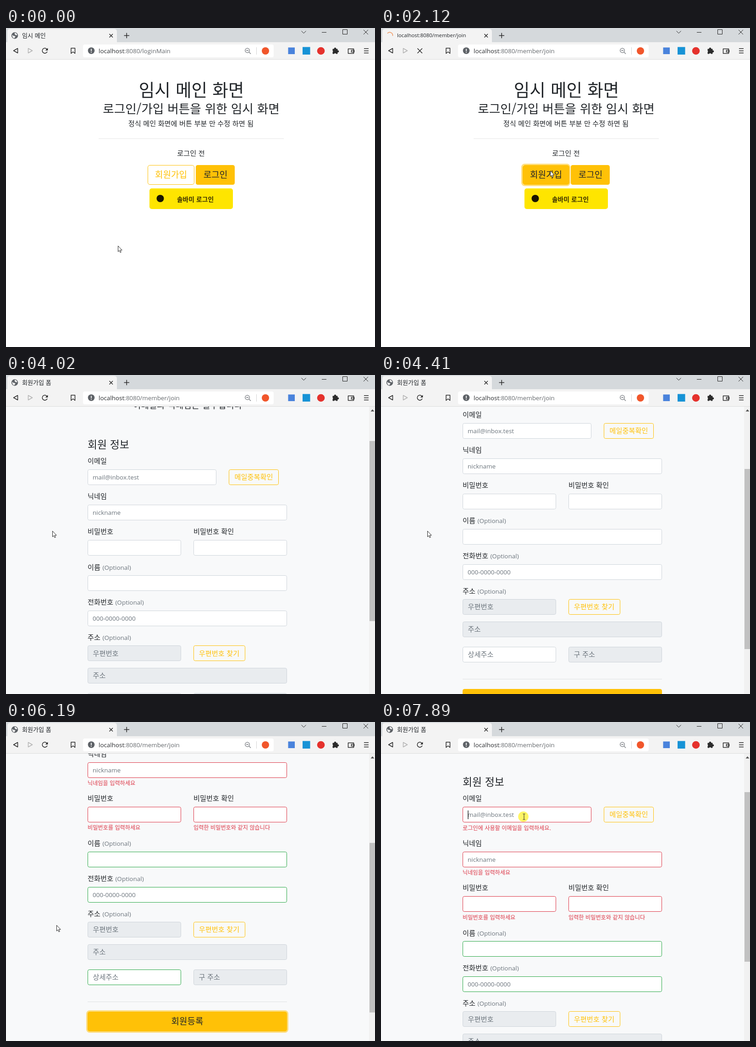
Write an HTML page that moves like this. It is 805x696 px and loops after 8000 ms.

```html
<!DOCTYPE html>
<html lang="ko">
<head>
<meta charset="utf-8">
<title>회원가입</title>
<style>
html, body { margin: 0; width: 100%; height: 100%; overflow: hidden; background: #fff; }
svg { display: block; width: 805px; height: 696px; }

/* type */
text { font: 300 15.2px "Noto Sans CJK KR", "Noto Sans CJK", sans-serif; word-spacing: .015em; fill: #212529; white-space: pre; }
.mid { text-anchor: middle; }
.latin { font: 400 13.5px "Open Sans", sans-serif; word-spacing: 0; }
.hint, .hint tspan { fill: #6c757d; }
.big { font-size: 19px; }
.tab { font-size: 13px; }
.tab.latin { font-size: 11.4px; }
.url { font-size: 13.4px; fill: #2b2d30; }
.url tspan { fill: #666a6e; }
.gold { fill: #ffc107; }
.note { font-size: 12.15px; fill: #dc3545; }

/* shapes */
.line { fill: none; stroke: #2b2b2b; stroke-width: 1.5; }
.thin { fill: none; stroke: #222; stroke-width: 1; }
.in { height: 33px; rx: 3.2px; fill: #fff; stroke: #ced4da; }
.off { fill: #e9ecef; }
.btn { rx: 4.3px; fill: #ffc107; }
.ghost { height: 33px; rx: 3.2px; fill: none; stroke: #ffc107; }
.ring { rx: 6px; fill: none; stroke: #ffc107; stroke-opacity: .5; stroke-width: 3; }

/* one shared eight second loop */
.home, .join, .before, .after, .idle, .busy, .ready, .bad, .ok, .note, .push,
.focus1, .focus2, .arrow, .hand, .beam, .click, .caret, .up { animation: 8s step-end infinite; }
.home { animation-name: home; }
.join { animation-name: join; }
.before { animation-name: before; }
.after { animation-name: after; }
.idle { animation-name: idle; }
.busy { animation-name: busy; }
.ready { animation-name: ready; }
.bad { animation-name: bad; }
.ok { animation-name: ok; }
.note { animation-name: note; }
.push { animation-name: push; }
.focus1 { animation-name: focus1; }
.focus2 { animation-name: focus2; }
.arrow { animation-name: arrow; }
.hand { animation-name: hand; }
.beam { animation-name: beam; }
.click { animation-name: click; }
.caret { animation-name: caret; }
.up { animation-name: up; }
.signup { animation: signup 8s linear infinite; }
.signup-text { animation: signup-text 8s linear infinite; }
.submit { animation: submit 8s linear infinite; }
.scroll { animation: scroll 8s ease-in-out infinite; }
.thumb { fill: #c1c1c1; animation: thumb 8s ease-in-out infinite, thumb-size 8s step-end infinite; }
.cursor { animation: cursor 8s ease-in-out infinite; }
.spin { transform-origin: 19px 16px; animation: spin 1s -.88s linear infinite; }

@keyframes home { 0% { opacity: 1 } 36.875%, to { opacity: 0 } }
@keyframes join { 0% { opacity: 0 } 38.625%, to { opacity: 1 } }
@keyframes before { 0% { opacity: 1 } 20.25%, to { opacity: 0 } }
@keyframes after { 0% { opacity: 0 } 20.25%, to { opacity: 1 } }
@keyframes idle { 0% { opacity: 1 } 20.25% { opacity: 0 } 39.25%, to { opacity: 1 } }
@keyframes busy { 0% { opacity: 0 } 20.25% { opacity: 1 } 39.25%, to { opacity: 0 } }
@keyframes ready { 0% { opacity: 0 } 39.25%, to { opacity: 1 } }
@keyframes bad { 0% { stroke: #ced4da } 67.75%, to { stroke: #dc3545 } }
@keyframes ok { 0% { stroke: #ced4da } 67.75%, to { stroke: #28a745 } }
@keyframes note { 0% { opacity: 0 } 67.75%, to { opacity: 1 } }
@keyframes push { 0% { transform: none } 67.75%, to { transform: translateY(var(--d)) } }
@keyframes focus1 { 0% { opacity: 0 } 19.375%, to { opacity: 1 } }
@keyframes focus2 { 0% { opacity: 0 } 67.25%, to { opacity: 1 } }
@keyframes caret { 0% { opacity: 0 } 98.625%, to { opacity: 1 } }
@keyframes up { 0% { fill: #a3a3a3 } 48.25%, to { fill: #505050 } }
@keyframes click {
  0% { opacity: 0 } 19.375% { opacity: .6 } 21.25% { opacity: 0 }
  67.25% { opacity: .6 } 68.5% { opacity: 0 } 98.625%, to { opacity: .6 }
}
@keyframes arrow {
  0% { opacity: 1 } 11.25% { opacity: 0 } 21.25% { opacity: 1 } 64.2% { opacity: 0 }
  68.6% { opacity: 1 } 89.9% { opacity: 0 } 90.8% { opacity: 1 } 93.1%, to { opacity: 0 }
}
@keyframes hand {
  0% { opacity: 0 } 11.25% { opacity: 1 } 21.25% { opacity: 0 }
  64.2% { opacity: 1 } 68.6%, to { opacity: 0 }
}
@keyframes beam { 0% { opacity: 0 } 89.9% { opacity: 1 } 90.8% { opacity: 0 } 93.1%, to { opacity: 1 } }
@keyframes signup { 0%, 11.25% { fill: #fff } 13.25%, to { fill: #ffc107 } }
@keyframes signup-text { 0%, 11.25% { fill: #ffc107 } 13.25%, to { fill: #212529 } }
@keyframes submit { 0%, 64.25% { fill: #ffc107 } 66.25%, 68.5% { fill: #e0a800 } 70.375%, to { fill: #ffc107 } }
@keyframes scroll {
  0%, 48.125% { transform: none }
  50.25%, 52.25% { transform: translateY(-99px) }
  55%, 55.125% { transform: translateY(-200px) }
  57.9%, 67.74% { transform: translateY(-298px) }
  67.75%, 77% { transform: translateY(-319px) }
  79.75% { transform: translateY(-219px); animation-timing-function: ease-in }
  80.75% { transform: translateY(-204px); animation-timing-function: ease-out }
  83.375%, to { transform: translateY(-120px) }
}
@keyframes thumb {
  0%, 48.125% { transform: none }
  50.25%, 52.25% { transform: translateY(59px) }
  55%, 55.125% { transform: translateY(120px) }
  57.9%, 67.74% { transform: translateY(178px) }
  67.75%, 77% { transform: translateY(181px) }
  79.75% { transform: translateY(124px); animation-timing-function: ease-in }
  80.75% { transform: translateY(116px); animation-timing-function: ease-out }
  83.375%, to { transform: translateY(68px) }
}
@keyframes thumb-size { 0% { height: 393px } 67.75%, to { height: 370px } }
@keyframes cursor {
  0%, 5.4% { transform: translate(244px, 475px) }
  13.625%, 26.5% { transform: translate(369px, 311px) }
  36% { transform: translate(110px, 334px) }
  36.875%, 58% { transform: translate(101px, 340px) }
  65%, 68.5% { transform: translate(319px, 603px) }
  72.125%, 74.125% { transform: translate(118px, 443px) }
  75.5%, 85% { transform: translate(110px, 443px) }
  94.5%, 95.25% { transform: translate(311px, 207px) }
  96%, to { transform: translate(312px, 207px) }
}
@keyframes spin { to { transform: rotate(360deg) } }
</style>
</head>
<body>
<svg width="805" height="696" xmlns="http://www.w3.org/2000/svg">
  <clipPath id="view"><rect y="69" width="805" height="627"/></clipPath>
  <rect width="805" height="696" fill="#fff"/>

  <!-- first page -->
  <g class="home">
    <text class="mid" x="404.5" y="148.5" style="font-size:37.6px">임시 메인 화면</text>
    <text class="mid" x="404" y="186" style="font-size:26.7px">로그인/가입 버튼을 위한 임시 화면</text>
    <text class="mid" x="403.5" y="214">정식 메인 화면에 버튼 부분 만 수정 하면 됨</text>
    <path d="M202 241.5H606" stroke="#e5e5e5"/>
    <text class="mid" x="403.5" y="279">로그인 전</text>
    <rect class="ring focus1" x="307.5" y="297.5" width="104" height="46"/>
    <rect class="btn signup" x="309.5" y="299.5" width="101" height="42" stroke="#ffc107"/>
    <text class="mid big signup-text" x="360" y="327">회원가입</text>
    <rect class="btn" x="414" y="299" width="85" height="43"/>
    <text class="mid big" x="457" y="327">로그인</text>
    <rect x="313" y="350" width="182" height="45" rx="5" fill="#fee500"/>
    <circle cx="336.5" cy="372" r="8" fill="#191600"/>
    <text class="mid" x="413" y="378.5" style="font-size:13.8px;font-weight:700;fill:#3a3000">솔바미 로그인</text>
  </g>

  <!-- sign-up form -->
  <g class="join" clip-path="url(#view)">
    <rect y="68" width="805" height="628" fill="#f8f9fa"/>
    <g class="scroll">
      <text class="mid" x="395.5" y="140" style="font-size:30.4px">회원가입</text>
      <text class="mid big" x="396" y="172">이메일과 닉네임은 필수입니다</text>
      <text x="178" y="258.5" style="font-size:22.8px">회원 정보</text>

      <text x="178" y="292">이메일</text>
      <rect class="in bad" x="178.5" y="305.5" width="280"/>
      <text class="latin hint" x="189" y="327">mail@inbox.test</text>
      <path class="caret" d="M190 313V332" stroke="#000" stroke-width="1.2"/>
      <rect class="ghost" x="486.5" y="305.5" width="108"/>
      <text class="mid gold" x="540.5" y="327">메일중복확인</text>
      <text class="note" x="178" y="355.5">로그인에 사용할 이메일을 입력하세요.</text>

      <g class="push" style="--d:21px">
        <text x="178" y="369">닉네임</text>
        <rect class="in bad" x="178.5" y="382.5" width="434"/>
        <text class="latin hint" x="189" y="404">nickname</text>
        <text class="note" x="178" y="432">닉네임을 입력하세요</text>
      </g>

      <g class="push" style="--d:41px">
        <text x="178" y="446">비밀번호</text>
        <text x="409" y="446">비밀번호 확인</text>
        <rect class="in bad" x="178.5" y="459.5" width="203"/>
        <rect class="in bad" x="409.5" y="459.5" width="203"/>
        <text class="note" x="178" y="509.5">비밀번호를 입력하세요</text>
        <text class="note" x="409" y="509.5">입력한 비밀번호와 같지 않습니다</text>
      </g>

      <g class="push" style="--d:62px">
        <text x="178" y="523.5">이름 <tspan class="latin hint">(Optional)</tspan></text>
        <rect class="in ok" x="178.5" y="536.5" width="434"/>
        <text x="178" y="600">전화번호 <tspan class="latin hint">(Optional)</tspan></text>
        <rect class="in ok" x="178.5" y="613.5" width="434"/>
        <text class="latin hint" x="189" y="635">000-0000-0000</text>
        <text x="178" y="677">주소 <tspan class="latin hint">(Optional)</tspan></text>
        <rect class="in off" x="178.5" y="689.5" width="203"/>
        <text class="hint" x="189.5" y="711.5">우편번호</text>
        <rect class="ghost" x="409.5" y="689.5" width="112"/>
        <text class="mid gold" x="465" y="711.5">우편번호 찾기</text>
        <rect class="in off" x="178.5" y="738.5" width="434"/>
        <text class="hint" x="189.5" y="760">주소</text>
        <rect class="in ok" x="178.5" y="793.5" width="203"/>
        <text class="hint" x="189.5" y="815">상세주소</text>
        <rect class="in off" x="409.5" y="793.5" width="203"/>
        <text class="hint" x="420.5" y="815">구 주소</text>
        <path d="M178 863.5H613" stroke="#dfe1e3"/>
        <rect class="ring focus2" x="176.5" y="883.5" width="438" height="46"/>
        <rect class="btn submit" x="178" y="885" width="435" height="43"/>
        <text class="mid big" x="395.5" y="913.5">회원등록</text>
      </g>
    </g>
    <rect x="792" y="68" width="13" height="628" fill="#f1f1f1"/>
    <path class="up" d="M795.5 79.5L799.5 75L803.5 79.5Z"/>
    <rect class="thumb" x="793" y="85" width="12" height="393"/>
  </g>

  <!-- browser frame -->
  <rect width="805" height="31" fill="#d5d9dc"/>
  <path d="M3 31V8Q3 2 9 2H236Q242 2 242 8V31Z" fill="#f3f3f3"/>
  <rect y="31" width="805" height="37" fill="#f3f3f3"/>
  <path d="M0 68.5H805" stroke="#dcdcdc"/>
  <rect x="168" y="36" width="416" height="28" rx="4" fill="#fff"/>

  <g class="idle">
    <circle cx="19" cy="16.5" r="7.2" fill="#5f6368"/>
    <path d="M13.5 14.5Q16 18 19 17.5T18 22.5Q13 21 13.5 14.5ZM19 10.5Q24 11 24.5 16L21.5 15.5Q18 14.5 19 10.5Z" fill="#f3f3f3"/>
    <path class="line" d="M89.5 46.5A5.6 5.6 0 1 0 90 51.5"/>
    <path d="M91.3 43.5V49H85.8Z" fill="#2b2b2b"/>
  </g>
  <g class="busy">
    <path class="spin" d="M14 11.8A6.5 6.5 0 0 1 25.4 17.1" fill="none" stroke="#f0945a" stroke-width="1.5"/>
    <path class="line" d="M79.5 44.5L90 55M90 44.5L79.5 55"/>
    <text class="tab latin" x="35" y="20">localhost:8080/member/join</text>
  </g>
  <text class="tab before" x="35" y="21">임시 메인</text>
  <text class="tab ready" x="35" y="21">회원가입 폼</text>
  <text class="latin url before" x="202" y="55">localhost<tspan>:8080/loginMain</tspan></text>
  <text class="latin url after" x="202" y="55">localhost<tspan>:8080/member/join</tspan></text>

  <path class="line" d="M225.5 13L233 20.5M233 13L225.5 20.5M257.5 16.5H269M263.25 10.8V22.3"/>
  <path class="thin" d="M644.5 6.5L649.5 11.5L654.5 6.5M689 9.5H699M734.5 3.5H744.5V13.5H734.5ZM780 4L790 14M790 4L780 14"/>
  <path class="line" d="M16.5 49.5L25.5 44.5V54.5Z" stroke-linejoin="round"/>
  <path class="line" d="M57.5 49.5L48.5 44.5V54.5Z" stroke-linejoin="round" style="stroke:#b4b4b4"/>
  <path class="line" d="M142 44H150.5V55.5L146.25 52L142 55.5Z" stroke-linejoin="round"/>
  <circle cx="186" cy="49.5" r="7.3" fill="#5f6368"/>
  <path d="M186 45.5V50.5M186 52V53.8" stroke="#fff" stroke-width="1.8"/>
  <g fill="none" stroke="#777b80" stroke-width="1.3">
    <circle cx="526.5" cy="49" r="4.8"/>
    <path d="M530 52.5L534 56.5M524 49H529"/>
  </g>
  <path d="M546.5 42V58" stroke="#d4d4d4"/>
  <circle cx="566" cy="50" r="8" fill="#f1562b"/>
  <rect x="615.5" y="42.5" width="14.5" height="14.5" fill="#4a83dc"/>
  <rect x="647" y="41.5" width="16.5" height="16.5" fill="#1793d6"/>
  <circle cx="687" cy="50" r="8.3" fill="#e5322d"/>
  <g fill="#2b2b2b">
    <rect x="712.5" y="45.5" width="11" height="11" rx="1"/>
    <circle cx="718" cy="45" r="2.3"/>
    <circle cx="724" cy="51" r="2.3"/>
  </g>
  <path d="M712 49.2A2 2 0 0 1 712 53ZM716 57A2 2 0 0 1 720 57Z" fill="#f3f3f3"/>
  <path class="line" d="M746.5 45.5H758.5V55.5H746.5ZM759.5 48.5H753.5V52.5H759.5Z" stroke-linejoin="round"/>
  <path class="line" d="M781 45H791M781 49.8H791M781 54.6H791"/>

  <!-- pointer -->
  <g class="cursor">
    <circle class="click" cx="-1.5" cy="-.5" r="11.3" fill="#fff000"/>
    <path class="arrow" d="M.5 .5V13L3.3 10.4L5.2 14.9L7.2 14L5.3 9.7H9.2Z" fill="#fff" stroke="#111" stroke-width=".9"/>
    <path class="hand" d="M-1.7 1.2C-1.7 -.7 1.3 -.7 1.3 1.5V6C2.5 5.4 3.6 5.8 3.9 6.6C5 6.1 6 6.5 6.3 7.4C7.4 7.2 8.2 7.8 8.2 9V13C8.2 15 7 16 6.8 18H-1C-1.5 15.5 -4 13 -5.2 11C-6 9.6 -4.2 8.8 -3 10L-1.7 11.2ZM1.3 6V9.5M3.9 6.6V9.5M6.3 7.4V10" fill="#fff" stroke="#111" stroke-width=".9"/>
    <path class="beam" d="M-2.5 -6.5H-.5L0 -6L.5 -6.5H2.5M0 -6V5.5M-2.5 6H-.5L0 5.5L.5 6H2.5" fill="none" stroke="#222"/>
  </g>
</svg>
</body>
</html>
```
